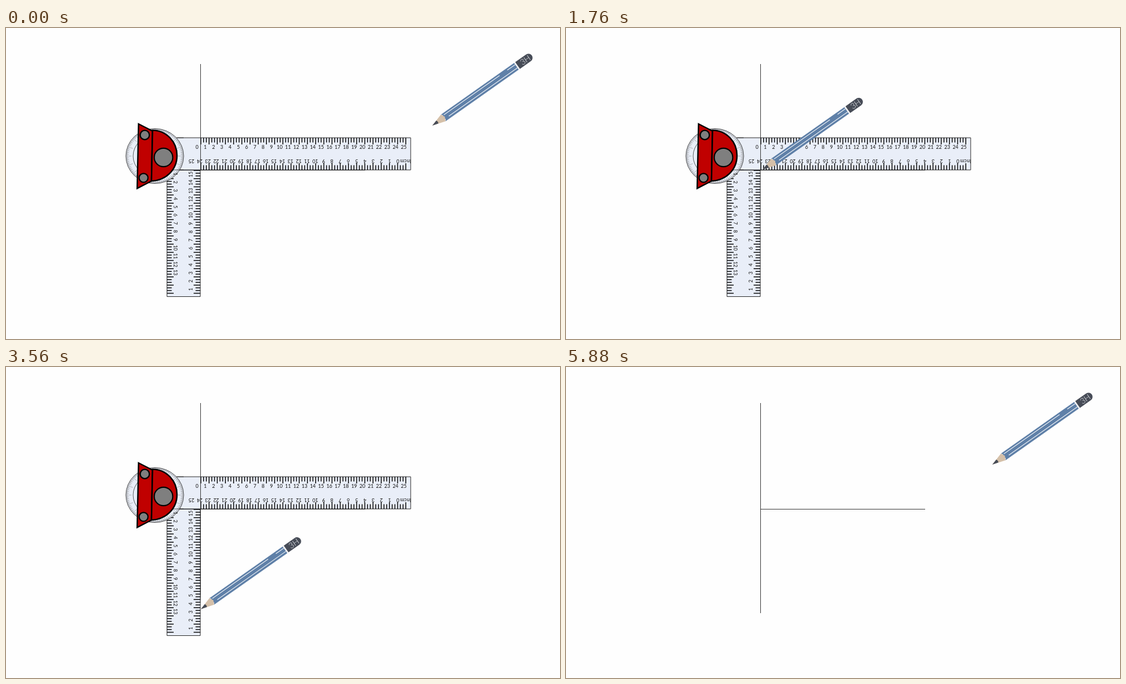
An HTML page with a canvas for the animation above (5920 ms loop, 998 by 561 pixels).

```html
<!DOCTYPE html>
<html lang="en">
<head>
<meta charset="utf-8">
<title>Drawing a perpendicular line</title>
<style>
html, body { margin: 0; width: 100%; height: 100%; overflow: hidden; background: #fefefe; }
canvas { display: block; }
</style>
</head>
<body>
<canvas id="stage" width="998" height="561"></canvas>
<script>
const ctx = document.getElementById('stage').getContext('2d');
const LOOP = 5920, MOVE = 1750, HIDE_RULER = 5880, CM = 14.77;
const PLASTIC = '#e9eef8', RED = '#c00000', GREY = '#7f7f7f', DARK = '#474c57';

// Pencil tip moves: start time, from, to
const moves = [
  [100, [768, 176], [352, 256]],
  [2055, [352, 256], [351, 444]],
  [4015, [351, 444], [768, 176]],
];

const clamp = v => Math.min(1, Math.max(0, v));
const ease = x => x < 0.5 ? 2 * x * x : 1 - 2 * (1 - x) ** 2;

function tipAt(t) {
  const [start, a, b] = moves.filter(m => t >= m[0]).pop() || moves[0];
  const p = ease(clamp((t - start) / MOVE));
  return a.map((v, i) => v + (b[i] - v) * p);
}

function line(x1, y1, x2, y2) {
  ctx.beginPath();
  ctx.moveTo(x1, y1);
  ctx.lineTo(x2, y2);
  ctx.stroke();
}

function shape(path, fill, width, stroke = '#000') {
  const p = new Path2D(path);
  ctx.fillStyle = fill;
  ctx.fill(p);
  if (!width) return;
  ctx.lineWidth = width;
  ctx.strokeStyle = stroke;
  ctx.stroke(p);
}

function oval(x, y, rx, ry, fill, width, stroke = '#000') {
  ctx.beginPath();
  ctx.ellipse(x, y, rx, ry, 0, 0, 7);
  if (fill) {
    ctx.fillStyle = fill;
    ctx.fill();
  }
  ctx.lineWidth = width;
  ctx.strokeStyle = stroke;
  ctx.stroke();
}

function label(text, x, y, turn = 0) {
  ctx.save();
  ctx.translate(x, y);
  ctx.rotate(turn * Math.PI / 2);
  ctx.fillText(text, 0, 3.2);
  ctx.restore();
}

// Three marks per centimetre, every third one long
function ticks(cm, draw) {
  ctx.strokeStyle = '#000';
  ctx.lineWidth = 1.5;
  for (let i = 0; i <= cm * 3; i++) draw(i * CM / 3, i % 3 ? 8.5 : 12);
}

function protractor() {
  oval(268, 231, 52, 49.5, PLASTIC, 1, '#333');
  oval(268, 231, 50, 47.7, null, 0.6, '#666');
  oval(268, 231, 39, 37, null, 0.8, '#333');
  ctx.strokeStyle = '#888';
  ctx.lineWidth = 0.6;
  for (let i = 0; i < 90; i++) {
    const a = i * Math.PI / 45, c = Math.cos(a), s = Math.sin(a);
    const r = i % 5 ? 46.5 : 42;
    line(268 + 50 * c, 231 + 47.7 * s, 268 + r * c, 231 + r * 0.953 * s);
  }
}

function ruler() {
  shape('M290 256.5H350V484.5H290Z', PLASTIC, 1, '#222');
  shape('M290 198H729V256H290Z', PLASTIC, 1, '#222');

  ticks(25, (d, len) => {
    line(351 + d, 198, 351 + d, 198 + len);
    line(351 + d, 256, 351 + d, 256 - len);
  });
  ticks(15, (d, len) => {
    const y = 478.5 - d;
    if (y > 262) line(290, y, 290 + len, y);
    line(350, y, 350 - len, y);
  });

  ctx.fillStyle = '#111';
  ctx.font = '9px Lato, Carlito, sans-serif';
  ctx.textAlign = 'center';
  for (let i = 0; i <= 25; i++) {
    label(i, 344 + 14.9 * i, 214.5);
    label(i, 706 - 14.88 * i, 240, 2);
  }
  label('cm', 716, 240, 2);
  label('In', 726, 240, 2);
  for (let i = 1; i <= 15; i++) {
    if (i < 14) label(i, 305.5, 248.5 + 14.81 * i, 1);
    label(i, 333, 486.3 - 14.82 * i, -1);
  }

  protractor();
  // Arm edges show through the disc
  ctx.strokeStyle = '#222';
  ctx.lineWidth = 0.8;
  line(308, 198, 320, 198);
  line(290, 256, 320, 256);
  ctx.fillStyle = '#111';
  label(1, 305.5, 263.3, 1);

  ctx.lineJoin = 'miter';
  shape('M238.8 173L264 186L262 276L236.3 289.3Z', RED, 2.5);
  shape('M264 184.5C290 185 308 206 308 230C308 256 288 275 262 276Z', RED, 2.6);
  oval(250, 193, 8.3, 8.3, GREY, 2.3);
  oval(247.8, 270.3, 8, 8, GREY, 2.3);
  oval(283.7, 233.5, 16.7, 16.7, GREY, 2.2);
}

// Drawn along the x axis with the tip at the origin
function pencil([x, y]) {
  ctx.save();
  ctx.translate(x, y);
  ctx.rotate(-35.2 * Math.PI / 180);
  shape('M0 0L24 -7.3L28 0L24 7.3Z', '#d5c0a9');
  shape('M0 0L11 -3.3Q13 0 11 3.3Z', DARK);
  shape('M24 -7.3H185.5V7.3H24Q27 5 26 2.5Q29 0 26 -2.5Q27 -5 24 -7.3Z', '#5f80a8');
  ctx.strokeStyle = '#eef2f7';
  ctx.lineWidth = 1.2;
  line(28, -3.8, 151, -3.8);
  line(168, -3.8, 185.5, -3.8);
  line(34, 3.2, 185.5, 3.2);
  shape('M185.5 -7.3H188V7.3H185.5Z', '#f0f0f2');
  shape('M188 -7.4H212A7.4 7.4 0 0 1 212 7.4H188Z', DARK);
  ctx.fillStyle = '#eef0f3';
  ctx.font = '300 14.5px Lato, sans-serif';
  ctx.textAlign = 'center';
  ctx.fillText('3H', 205, 5);
  ctx.restore();
}

// The lower half of the vertical line wipes in with a soft edge
function drawnLines(t) {
  ctx.fillStyle = '#333';
  ctx.fillRect(350, 65, 1, 192);
  ctx.fillRect(351, 256, 296, 1);
  const lead = 256 + Math.max(0, t - 2000) * 0.11;
  if (lead <= 257) return;
  const fade = ctx.createLinearGradient(0, lead - 20, 0, lead);
  fade.addColorStop(0, '#333');
  fade.addColorStop(1, '#3330');
  ctx.fillStyle = fade;
  ctx.fillRect(350, 257, 1, Math.min(444, lead) - 257);
}

function frame() {
  const t = performance.now() % LOOP;
  ctx.fillStyle = '#fefefe';
  ctx.fillRect(0, 0, 998, 561);
  if (t < HIDE_RULER) ruler();
  drawnLines(t);
  pencil(tipAt(t));
  requestAnimationFrame(frame);
}
frame();
</script>
</body>
</html>
```
